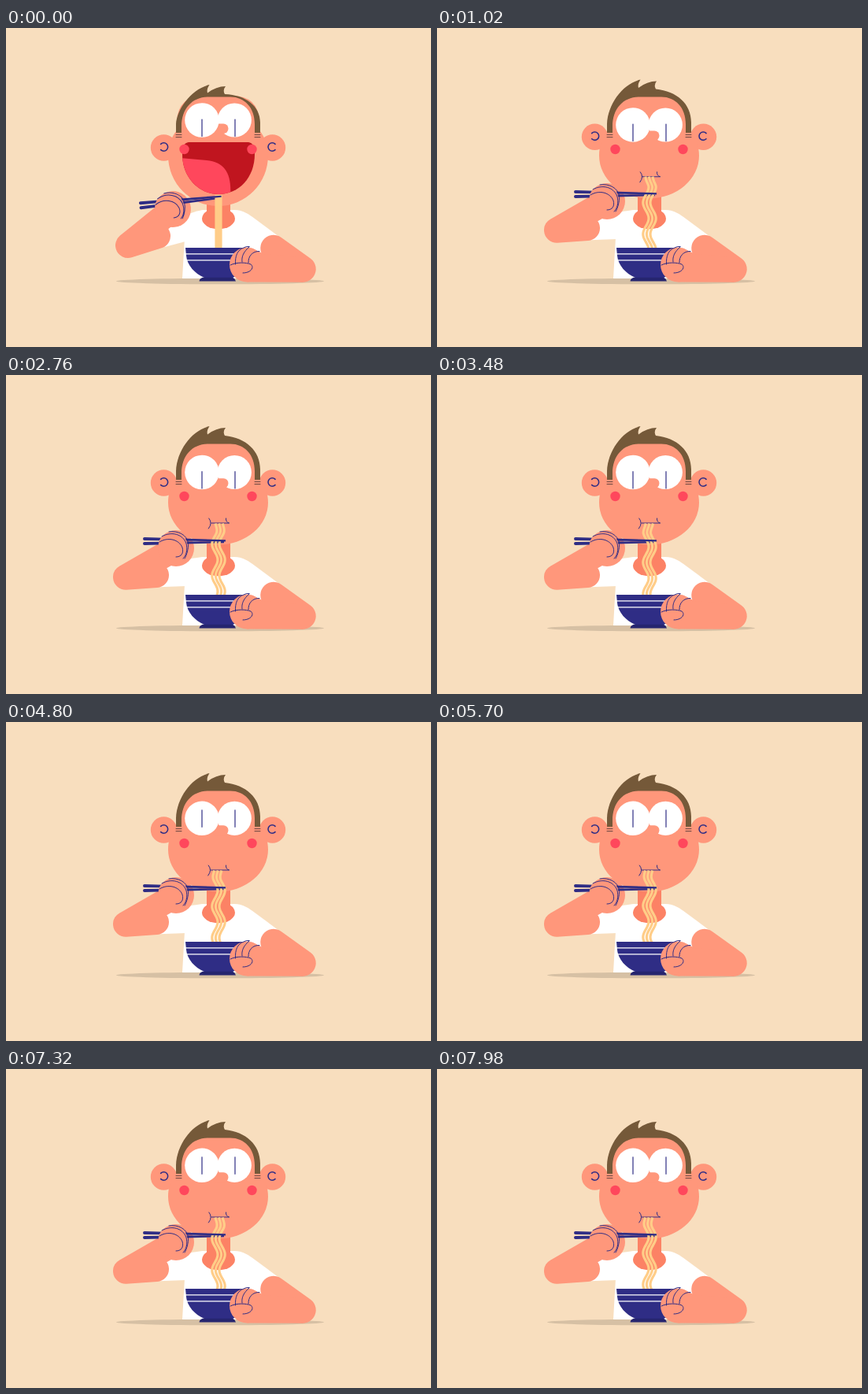
Write an HTML page that moves like this. It is 540x405 px and loops after 8000 ms.

```html
<!DOCTYPE html>
<html lang="en">
<head>
<meta charset="utf-8">
<title>Noodle lunch</title>
<style>
  html, body { margin: 0; width: 100%; height: 100%; overflow: hidden; background: #f8debe; }
  svg { display: block; width: 100%; height: 100%; }
  .skin { fill: #ff977b; }
  .limb { fill: none; stroke: #ff977b; stroke-width: 32; stroke-linecap: round; stroke-linejoin: round; }
  .line { fill: none; stroke: #2f2d85; stroke-width: 1; stroke-linecap: round; }
  .navy { fill: #2f2d85; }
  .neck { fill: #fc8265; }
  .white { fill: #fff; }
  .blush { fill: #ff475c; }
  .hair { fill: #755939; }
  .noodle { fill: none; stroke: #ffcd88; stroke-width: 3.2; }
</style>
</head>
<body>
<svg viewBox="0 0 540 405">
  <defs><clipPath id="mouthClip"><path id="mouthHole"/></clipPath></defs>
  <rect width="540" height="405" fill="#f8debe"/>
  <ellipse cx="272" cy="321.5" rx="132" ry="3.8" fill="#d6c0a4"/>

  <path class="white" d="M250 231H290C302 231 309 237 316 242L347 265L326 290L316 318H224L227 266L232 238Z"/>
  <path id="sleeve" class="white"/>
  <ellipse class="neck" cx="270" cy="242" rx="21" ry="13.3"/>
  <rect class="neck" x="255" y="200" width="30" height="38"/>

  <g id="ears">
    <circle class="skin" cx="200.5" r="16.7"/>
    <circle class="skin" cx="338.5" r="16.7"/>
    <path class="line" style="stroke-width:1.6" d="M196.7-4.6A5.2 5.2 0 1 1 196.7 2.6M342-4.6A5.2 5.2 0 1 0 342 2.6"/>
  </g>
  <path id="face" class="skin"/>
  <path id="hair" class="hair"/>
  <path class="line" style="stroke:#65443f" d="M216 135.6H223M216 138.6H223M316 135.6H323M316 138.6H323"/>

  <path id="mouth" fill="#c0151f"/>
  <g clip-path="url(#mouthClip)"><path id="tongue" class="blush"/></g>
  <path id="lips" class="line"/>
  <circle class="blush" cx="226.5" cy="154" r="6.2"/>
  <circle class="blush" cx="312.5" cy="154" r="6.2"/>

  <circle id="rightEye" class="white" cx="290.3" r="21.6"/>
  <rect id="nose" class="skin" x="262" width="20.5" height="12.5" rx="6.2"/>
  <circle id="leftEye" class="white" cx="249" r="21.8"/>
  <path id="pupils" class="line" style="stroke-width:1.2"/>

  <path id="arm" class="limb"/>
  <g class="hand">
    <circle class="skin" r="23"/>
    <path class="navy" d="M-40-8L61-9V-6.8L-40-4A2 2 0 0 1-40-8"/>
  </g>
  <path id="noodles" class="noodle"/>
  <g class="hand">
    <path class="navy" d="M-40-14L63-10.8V-8.6L-40-10A2 2 0 0 1-40-14"/>
    <ellipse class="skin" cx="-4" cy="-3" rx="18.5" ry="18"/>
    <path class="line" d="M-9-21C2-23 14-17 15.5-7C16 0 14 8 11 13M-18-15C-6-22 9-18 13-6C15 2 13 9 9 13M-21-8C-10-15 4-11 8-1C10 6 7 11 0 11"/>
  </g>

  <path class="navy" d="M228 279H308V291C306 303 298 313 288 317H252C240 312 230 301 229 289Z"/>
  <path d="M228 286.8H306M229 294.8H306" stroke="#fff" stroke-width="1.3"/>
  <path d="M250 316.8H288Q291 318 292 321.5H245.5Q246 318 250 316.8Z" fill="#26256f"/>

  <path class="limb" style="stroke-width:33.5" d="M340 279.5L377 306"/>
  <circle class="skin" cx="306" cy="300.5" r="22"/>
  <path class="skin" d="M306 322.5L312 279.3L328 287L377 290V322.7Z"/>
  <path class="line" d="M291.5 300C291 289 294 282 302 279Q305 277 309 277.5M300 297C299 290 302 284 309 278M308 298C307.5 290 313 283 322 283.5M285 301C293 297 305 297.5 311 300C316 304 311 311 301 311"/>
</svg>

<script>
const LOOP = 8000, STEP = 60, RIPPLE = 455, WAVE = 40;
const $ = id => document.getElementById(id);
const set = (id, name, value) => $(id).setAttribute(name, value);
const draw = (id, d) => set(id, 'd', d);
const mix = (a, b, k) => a + (b - a) * k;
const clamp = x => Math.max(0, Math.min(1, x));
const ease = x => x < 0.5 ? 4 * x ** 3 : 1 - 4 * (1 - x) ** 3;
const progress = (t, start, end) => ease(clamp((t - start) / (end - start)));
const hands = document.querySelectorAll('.hand');

function drawHead(k, lookUp) {
  set('ears', 'transform', `translate(0 ${mix(152, 137, k)})`);

  const chin = mix(226, 215.5, k), mid = 162, jaw = chin - mid;
  draw('face', `M206 ${mid}C206 150 210 138 217 130V118Q219 86 252 86H287Q320 86 322 118V130C329 138 333 150 333 ${mid}A63.5 ${jaw} 0 0 1 206 ${mid}Z`);

  const y = mix(7, 0, k);
  draw('hair', `M216 133V122C217 ${96 + y} 236 ${70 + y} 258.5 ${65 + y}C256 ${69 + y} 255 ${72 + y} 256 ${75.5 + y}Q267 ${67 + y} 279 ${67 + y}Q275 ${72 + y} 278 ${77 + y}C305 ${80 + y * 0.7} 323 ${96 + y * 0.5} 323 120V133H316V122C316 101 303 87.5 285 87.5H257C237 87.5 223 102 223 125V133Z`);

  const eye = mix(117, 123.5, k) - 1.2 * lookUp;
  set('leftEye', 'cy', eye);
  set('rightEye', 'cy', eye);
  const top = eye + mix(-1, -10.5, lookUp);
  draw('pupils', `M249 ${top}v21.5M291 ${top}v21.5`);
  set('nose', 'y', mix(121.5, 131.3, k));
}

function drawMouth(t, k, headK) {
  const open = 1 - k, lipY = mix(198, 188, headK);
  const x = v => mix(272, v, mix(0.25, 1, open));
  const y = v => mix(lipY, v, open);
  const hole = `M${x(232)} ${y(145)}H${x(308)}Q${x(316)} ${y(146)} ${x(316)} ${y(160)}C${x(316)} ${y(190)} ${x(296)} ${y(211)} ${x(270)} ${y(211)}C${x(245)} ${y(211)} ${x(224)} ${y(190)} ${x(224)} ${y(160)}Q${x(224)} ${y(146)} ${x(232)} ${y(145)}Z`;
  const shown = open > 0.015;
  draw('mouth', shown ? hole : '');
  draw('mouthHole', hole);
  draw('tongue', shown ? `M${x(220)} ${y(165)}L${x(255)} ${y(168)}C${x(278)} ${y(170)} ${x(287)} ${y(185)} ${x(285)} ${y(214)}H${x(220)}Z` : '');

  const left = 257.5 + Math.sin(2 * Math.PI * t / RIPPLE) * 0.8;
  draw('lips', shown ? '' : `M${left} ${lipY - 6}Q${left + 5} ${lipY} ${left - 0.5} ${lipY + 7}M${left + 3} ${lipY}H283M279.5 ${lipY - 6}Q279 ${lipY - 1} 283.5 ${lipY}`);
}

function drawArm(k) {
  const elbow = [mix(155, 152, k), mix(276, 256.7, k)];
  const cuff = [mix(193, 191, k), mix(264, 254, k)];
  const hand = [mix(212, 216, k), mix(230, 220, k)];
  draw('arm', `M${cuff}L${elbow}L${hand}`);
  draw('sleeve', `M252 231Q236 232 ${cuff[0] + 8} ${cuff[1] - 14}L${cuff[0] + 4} ${cuff[1] + 15.3}L228 ${mix(271, 268, k)}Z`);
  for (const g of hands)
    g.setAttribute('transform', `translate(${hand}) rotate(${mix(-6, 0, k)})`);
}

function drawNoodles(t, k) {
  const top = mix(212, 188.5, k), swing = 3.6 * k, gap = mix(3, 4.6, k);
  const crest = 234 + WAVE * (t - 4800) / RIPPLE;
  let d = '';
  for (const strand of [-1, 0, 1]) {
    for (let i = 0; i <= 45; i++) {
      const y = mix(top, 280, i / 45);
      const fade = clamp(0.3 + (y - top) / 18);
      const x = 270 + strand * gap
        - swing * fade * Math.cos(2 * Math.PI * (y - crest) / WAVE);
      d += `${i ? 'L' : 'M'}${x.toFixed(2)} ${y.toFixed(2)}`;
    }
  }
  draw('noodles', d);
}

function render(now) {
  const t = Math.floor(now % LOOP / STEP) * STEP;
  const head = progress(t, 0, 1400), reach = progress(t, 0, 880);
  drawHead(head, progress(t, 4260, 4740));
  drawMouth(t, reach, head);
  drawArm(reach);
  drawNoodles(t, reach);
}

const start = performance.now();
function tick() {
  render(performance.now() - start);
  requestAnimationFrame(tick);
}
tick();
</script>
</body>
</html>
```
